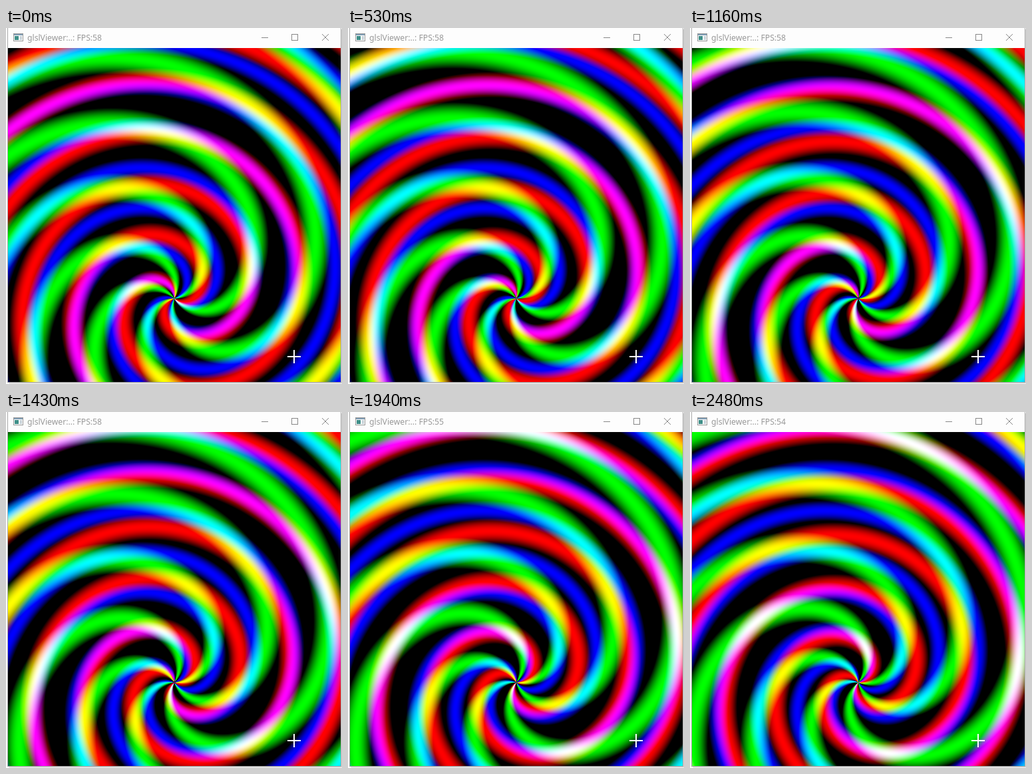
Write an HTML page with a canvas that moves like this. It is 505 px wide and 533 px high and loops after 2580 ms.

```html
<!DOCTYPE html>
<html lang="en">
<head>
<meta charset="utf-8">
<title>Spiral shader</title>
<style>
  html, body { margin: 0; width: 100%; height: 100%; overflow: hidden; background: #fff; }
  #stage { position: relative; width: 505px; height: 533px; overflow: hidden; }
  canvas { position: absolute; left: 3px; top: 30px; }
  svg { position: absolute; left: 0; top: 0; }
  text { font: 12.2px "Noto Sans", "Open Sans", sans-serif; fill: #999; }
</style>
</head>
<body>
<div id="stage">
  <canvas id="view" width="500" height="500"></canvas>
  <svg width="505" height="533" viewBox="0 0 505 533">
    <g shape-rendering="crispEdges">
      <rect x="3" y="0" width="500" height="30" fill="#fdfdfd"/>
      <path d="M2.5 0V530.5H503.5V0" fill="none" stroke="#a8a8a8"/>
      <path d="M4 531.5H504.5V2" fill="none" stroke="#d4d4d4"/>
      <path d="M5 532.5H505" stroke="#ececec"/>
      <rect x="11.5" y="8.5" width="14" height="11" fill="#fff" stroke="#999"/>
      <rect x="12" y="9" width="13" height="2" fill="#7f9db5"/>
      <rect x="13" y="12" width="6" height="6" fill="#3f8f88"/>
      <rect x="21" y="12" width="3" height="6" fill="#c9d3da"/>
      <path d="M384 14.5H394M429.5 9.5H438.5V18.5H429.5Z" fill="none" stroke="#888"/>
      <path d="M423 492H443M433 482V502" stroke="#fff" stroke-width="2"/>
    </g>
    <path d="M475 9L485 19M485 9L475 19" stroke="#888"/>
    <text id="title" x="32" y="19">glslViewer:..: FPS:58</text>
  </svg>
</div>
<script>
const SIZE = 500, LOOP = 2580, TABLE = 4096;
const TURN = TABLE / (2 * Math.PI);

// Per channel: number of arms, winding per unit radius, phase at zero, phase per second
const channels = [
  { arms: 3, wind: 40, phase: -2.36, rate: -0.9 },
  { arms: 6, wind: 30, phase: 0.42, rate: 1 },
  { arms: 5, wind: 50, phase: 0.1, rate: 0 }
];

// Runs of evenly spaced redraws: first time, last time, count
const runs = [
  [0, 0, 1], [60, 530, 8], [620, 1100, 8],
  [1160, 1670, 8], [1730, 2180, 8], [2270, 2480, 4]
];
const ticks = runs.flatMap(([from, to, n]) =>
  Array.from({ length: n }, (_, i) => from + (to - from) * i / Math.max(1, n - 1)));

const ctx = document.getElementById('view').getContext('2d');
const title = document.getElementById('title');
const image = ctx.createImageData(SIZE, SIZE);
const pixels = image.data.fill(255);

const shade = Uint8Array.from({ length: TABLE }, (_, i) =>
  Math.round(255 * Math.max(0, Math.sin(i / TURN))));

const fields = channels.map(() => new Int32Array(SIZE * SIZE));
for (let y = 0, p = 0; y < SIZE; y++) {
  for (let x = 0; x < SIZE; x++, p++) {
    const dx = (x + 0.5) / SIZE - 0.5;
    const dy = 0.75 - (y + 0.5) / SIZE;
    const angle = Math.atan2(dy, dx), radius = Math.hypot(dx, dy);
    channels.forEach((c, i) => {
      fields[i][p] = Math.round((c.arms * angle - c.wind * radius) * TURN);
    });
  }
}

function draw(ms) {
  channels.forEach((c, i) => {
    const field = fields[i];
    const shift = Math.round((c.phase + c.rate * ms / 1000) * TURN);
    for (let p = 0, q = i; p < field.length; p++, q += 4) {
      pixels[q] = shade[(field[p] + shift) & (TABLE - 1)];
    }
  });
  ctx.putImageData(image, 0, 0);
  const fps = ms < 1400 ? 58 : ms < 2400 ? 55 : 54;
  title.textContent = 'glslViewer:..: FPS:' + fps;
}

const start = performance.now();
let shown = -1;
function update() {
  const t = (performance.now() - start) % LOOP;
  let tick = 0;
  for (const at of ticks) if (at <= t) tick = at;
  if (tick !== shown) draw(shown = tick);
  requestAnimationFrame(update);
}
update();
</script>
</body>
</html>
```
